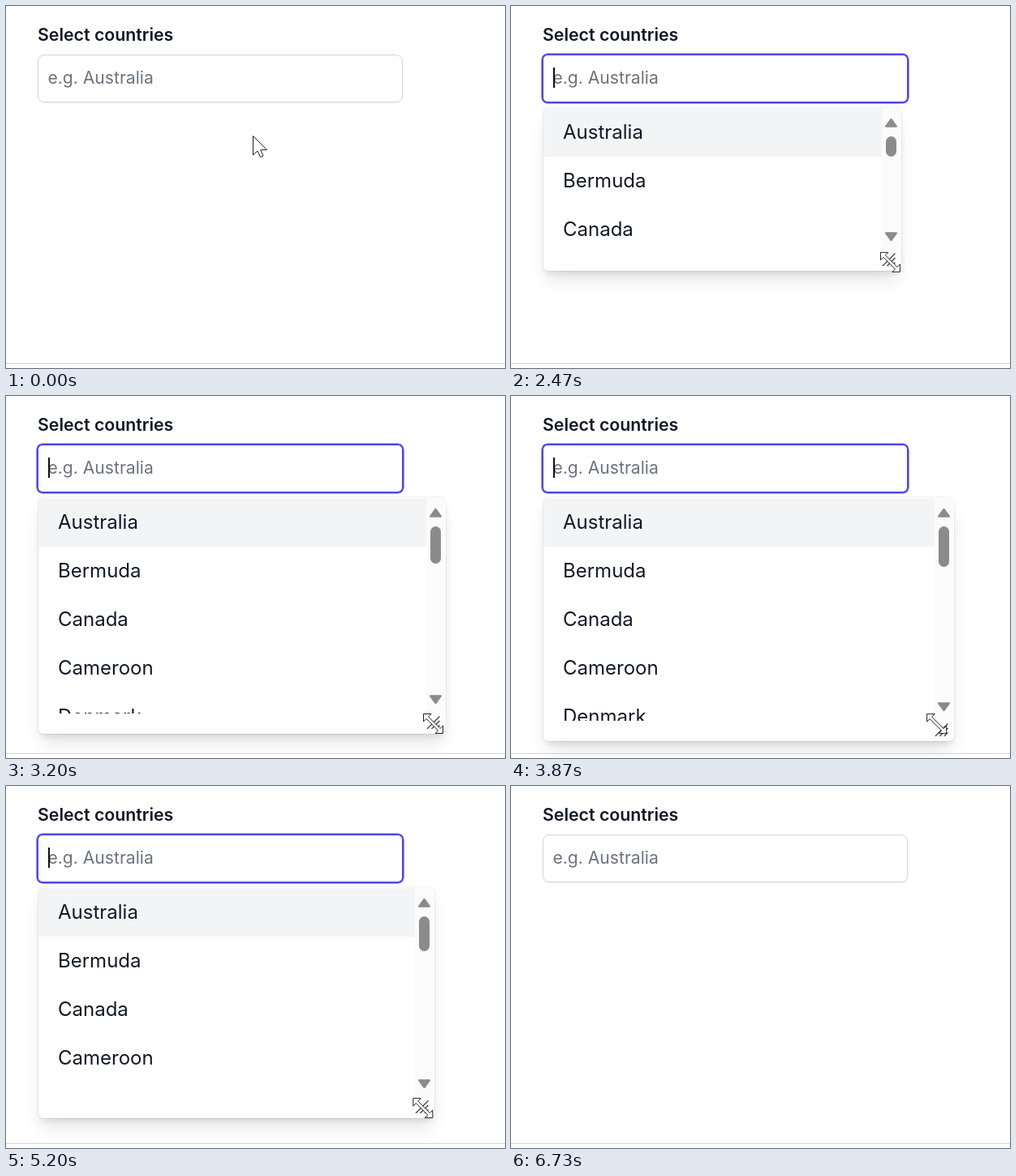
Recreate the animation shown at these times as an HTML page. Size 615 by 447 pixels, loop 7000 ms.

```html
<!DOCTYPE html>
<html lang="en">
<head>
<meta charset="utf-8">
<title>Select countries</title>
<style>
  html, body { margin: 0; width: 100%; height: 100%; overflow: hidden; background: #fff; }
  body { position: relative; font: 21.1px Inter, sans-serif; font-optical-sizing: none; color: #111827; }
  div, svg { position: absolute; box-sizing: border-box; white-space: nowrap; }
  #label { left: 39px; top: 20px; line-height: 31px; font-size: 21.3px; font-weight: 600; }
  #input { left: 39px; top: 60px; width: 450px; height: 59px; border: 1px solid #d1d5db; border-radius: 8px;
    box-shadow: 0 1.5px 3px rgba(0, 0, 0, .05); }
  #input.focus { left: 38px; top: 59px; width: 452px; height: 61px; border: 2px solid #4f46e5; border-radius: 7px;
    box-shadow: 0 0 0 .6px #4f46e5; }
  #hint { left: 51.5px; top: 73px; line-height: 32px; color: #6b7280; }
  #caret { left: 52px; top: 76px; width: 2px; height: 25px; background: #111; }
  #rule { left: 0; top: 441px; width: 100%; height: 1px; background: #d4d4d4; }
  #panel { left: 40px; top: 125px; background: #fff; border-radius: 6px;
    box-shadow: 0 0 0 1px rgba(0, 0, 0, .05), 0 15px 22px -4px rgba(0, 0, 0, .1), 0 6px 9px -3px rgba(0, 0, 0, .1); }
  #list { left: 0; top: 1px; right: 24px; bottom: 25px; overflow: hidden; font-size: 24px; }
  .row { left: 0; width: 100%; height: 60px; padding-left: 24px; line-height: 60px; }
  .row.on { background: #f3f4f6; }
  #track { right: 1px; top: 1px; bottom: 25px; width: 23px; background: #fbfbfb; }
  #thumb { left: 5px; top: 35px; width: 13px; border-radius: 6.5px; background: #8b8b8b; }
  .tip { left: 0; width: 23px; height: 36px; fill: #8b8b8b; stroke: #8b8b8b; stroke-width: 2; stroke-linejoin: round; }
  .tip.up { top: 0; }
  .tip.down { bottom: -1px; transform: scaleY(-1); }
  #grip { right: 0; bottom: 0; stroke: #444; stroke-width: 1.4; }
  #pointer { left: 0; top: 0; width: 100%; height: 100%; }
  #shape { fill: #fff; stroke: #111; stroke-width: .95; stroke-linejoin: round; }
</style>
</head>
<body>
<div id="label">Select countries</div>
<div id="input"></div>
<div id="hint">e.g. Australia</div>
<div id="caret"></div>
<div id="rule"></div>
<div id="panel">
  <div id="list"></div>
  <div id="track">
    <svg class="tip up"><path d="M5 22.7L11.5 13.7L18 22.7Z"/></svg>
    <div id="thumb"></div>
    <svg class="tip down"><path d="M5 22.7L11.5 13.7L18 22.7Z"/></svg>
  </div>
  <svg id="grip" width="24" height="25"><path d="M1 19L16.5 3.5M6.5 19L16.5 9M12 19L16.5 14.5"/></svg>
</div>
<svg id="pointer"><path id="shape"/></svg>
<script>
const LOOP = 7000, OPEN = 530, GRAB = 2300, RELEASE = 5600, CLOSE = 6590;
const ROW = 60, LIST_TOP = 126, CONTENT = 19 * ROW, LAG = 28;

const SHAPES = {
  arrow: 'M.5 .5V24L6 19L9.5 26.5L13 25L9.8 17.7H17.5Z',
  beam: 'M-4.5 -12H-1L0 -11L1 -12H4.5M0 -11V11M-4.5 12H-1L0 11L1 12H4.5',
  hand: 'M-2.3 19V2.5a2.4 2.4 0 0 1 4.8 0V10.5a2.3 2.3 0 0 1 4 .5a2.3 2.3 0 0 1 4 1a2 2 0 0 1 3 1.5' +
    'V21c0 4-2 5-2.5 10H-2.5c0-4-4-6-8-13c-1-2 2-4 4-1.5ZM2.5 10.5V16M6.5 11V16M10.5 12V16',
  resize: 'M-12 -12H-2.5L-6 -8.5L8.5 6L12 2.5V12H2.5L6 8.5L-8.5 -6L-12 -2.5Z'
};

const swing = u => (1 - Math.cos(Math.PI * u)) / 2;
const glide = u => Math.sin(Math.PI * u / 2);

// Each move eases the pointer to a new point and rests there until the next
const HOME = [304, 160];
const MOVES = [
  { from: 40, to: 330, end: [238, 84.5] },                  // to the input
  { from: 680, to: 1000, end: [402.5, 279.5] },             // down the list
  { from: 1270, to: 2070, end: [459.5, 304.5] },            // to the grip
  { from: 2392, to: 3600, end: [536.7, 419.7], ease: glide },
  { from: 3760, to: 4330, end: [404, 254] },
  { from: 4440, to: 5300, end: [517.5, 402.5] },
  { from: 5610, to: 5880, end: [373, 450] }                 // off the stage
];

const $ = id => document.getElementById(id);
const clamp = (v, lo, hi) => Math.min(hi, Math.max(lo, v));
const rows = ['Australia', 'Bermuda', 'Canada', 'Cameroon', 'Denmark'].map((name, i) => {
  const row = document.createElement('div');
  row.textContent = name;
  row.style.top = i * ROW + 'px';
  return $('list').appendChild(row);
});

function pointerAt(t) {
  return MOVES.reduce((pos, { from, to, end, ease = swing }) => {
    const k = ease(clamp((t - from) / (to - from), 0, 1));
    return pos.map((v, i) => v + (end[i] - v) * k);
  }, HOME);
}

function cornerAt(t) {
  const [x, y] = pointerAt(clamp(t - LAG, GRAB, RELEASE));
  return [x + 16.5, Math.max(320, y + 15)];
}

function shapeFor(t, x, y, cx, cy) {
  if (y > 60 && y < 119) return 'beam';
  if (t < OPEN) return 'arrow';
  if (x > cx - 24 && y > cy - 25 && x < cx && y < cy) return 'resize';
  return t < GRAB && y >= LIST_TOP && x < cx - 24 && y < cy - 25 ? 'hand' : 'arrow';
}

function draw(t) {
  const [x, y] = pointerAt(t), [cx, cy] = cornerAt(t);
  const view = cy - 25 - LIST_TOP;
  const hover = t > OPEN && t < GRAB + 30 ? clamp(Math.floor((y - LIST_TOP) / ROW), 0, 2) : 0;

  $('input').className = t >= OPEN && t < CLOSE ? 'focus' : '';
  $('caret').hidden = !(t >= 600 && t < 1270 || t >= 1800 && t < 6130);
  const panel = $('panel').style;
  panel.opacity = clamp(Math.min((t - 570) / 130, (6720 - t) / 140), 0, 1);
  panel.width = cx - 40 + 'px';
  panel.height = cy - 125 + 'px';
  $('thumb').style.height = Math.max(25, (view - 70) * view / CONTENT) + 'px';
  rows.forEach((row, i) => row.className = i === 0 || i === hover ? 'row on' : 'row');
  $('shape').setAttribute('d', SHAPES[shapeFor(t, x, y, cx, cy)]);
  $('shape').setAttribute('transform', `translate(${x} ${y})`);
}

const start = performance.now();
function tick() {
  draw((performance.now() - start) % LOOP);
  requestAnimationFrame(tick);
}
tick();
</script>
</body>
</html>
```
